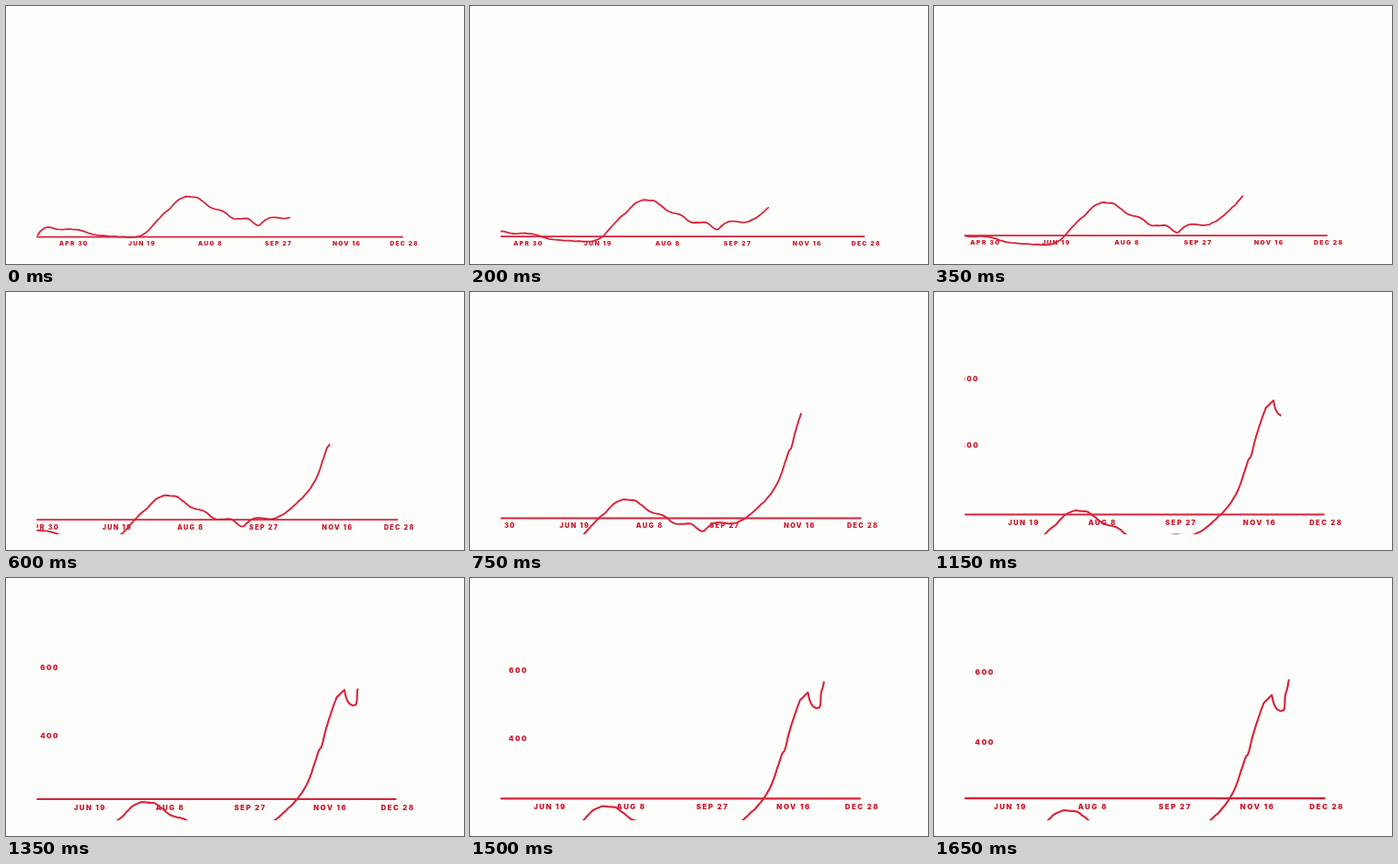
Animation, 498 px wide and 280 px high, one loop 1.7 s. Source, as an HTML page:

```html
<!DOCTYPE html>
<html lang="en">
<head>
<meta charset="utf-8">
<title>Rising line chart</title>
<style>
  html, body { margin: 0; width: 100%; height: 100%; overflow: hidden; background: #fdfefc; }
  svg { display: block; width: 100vw; height: 100vh; }
  text { font: 900 6.6px Inter, "Open Sans", sans-serif; letter-spacing: 1.25px; fill: #cb1c30; }
  .line { fill: none; stroke: #d8233a; stroke-width: 1.75; stroke-linejoin: round; }
</style>
</head>
<body>
<svg viewBox="0 0 498 280">
  <clipPath id="frame"><rect x="33.3" y="0" width="465" height="263"/></clipPath>
  <g clip-path="url(#frame)">
    <g id="axis"><path class="line" d="M-400 0H61.7"/></g>
    <g id="plot"><polyline id="curve" class="line"/></g>
    <g id="scale"></g>
  </g>
</svg>
<script>
const LOOP = 1700, STEP = 50, LAST = LOOP - STEP;
const $ = id => document.getElementById(id);
const mix = (a, b, u) => a + (b - a) * u;
const easeOut = (u, power) => 1 - (1 - u) ** power;
const smoothstep = u => u * u * (3 - 2 * u);

let seed = 7;
const wobble = () => ((seed = seed * 16807 % 2147483647) / 2147483647 - 0.5) * 0.7;

// Key points of the data line; the sharp peak joins the two parts
const climb = [
  [34, 249.5], [38, 244], [45, 240], [58, 242.5], [70, 242], [84, 244.3], [95, 248],
  [118, 250], [137, 251], [149, 248], [158, 240], [170, 226.8], [178, 220.2], [186, 211.5],
  [194, 207.3], [203, 207.3], [210, 209], [222, 218.5], [231, 221], [238, 224], [244, 229],
  [250, 231], [263, 230.7], [270, 236], [275, 238], [281, 233], [289, 229.5], [305, 230.3],
  [318, 224.4], [329, 215], [341, 202.5], [350.5, 186.6], [359.5, 160], [362.5, 155],
  [367, 137.5], [375.3, 112.9], [378, 108.5], [383.5, 103]
];
const rebound = [
  [383.5, 103], [386, 112.5], [390.7, 117.3], [394.7, 115.3], [395.5, 104], [397.3, 97.5], [399, 88.9]
];

// Catmull-Rom spline with a little roughness between the keys
function spline(keys, parts = 4) {
  const key = i => keys[Math.max(0, Math.min(keys.length - 1, i))];
  const out = [keys[0]];
  for (let i = 0; i < keys.length - 1; i++) {
    for (let k = 1; k <= parts; k++) {
      const u = k / parts;
      const [x, y] = [0, 1].map(d => {
        const [a, b, c, e] = [-1, 0, 1, 2].map(j => key(i + j)[d]);
        return b + u / 2 * (c - a + u * (2 * a - 5 * b + 4 * c - e + u * (3 * (b - c) + e - a)));
      });
      out.push([x, k < parts ? y + wobble() : y]);
    }
  }
  return out;
}
const points = [...spline(climb), ...spline(rebound)];

// Camera keys, joined by straight moves
const times = [0, 350, 1000, LAST];
const zoom  = [1, 1.039, 1.136, 1.207];
const panY  = [207, 213.5, 233, 252.5];

function along(values, t) {
  const i = t < times[1] ? 0 : t < times[2] ? 1 : 2;
  return mix(values[i], values[i + 1], (t - times[i]) / (times[i + 1] - times[i]));
}

function addText(parent, str, x, y, anchor) {
  const el = document.createElementNS("http://www.w3.org/2000/svg", "text");
  el.textContent = str;
  el.setAttribute("x", x);
  el.setAttribute("y", y);
  el.setAttribute("text-anchor", anchor);
  parent.append(el);
}

// Dates fifty days apart, the last one closer
["APR 30", "JUN 19", "AUG 8", "SEP 27", "NOV 16", "DEC 28"].forEach((str, i) =>
  addText($("axis"), str, Math.min(74.2 * (i - 4), 62.5) + 0.6, 9.9, "middle"));
["400", "600"].forEach((str, i) =>
  addText($("scale"), str, 1.25, -59.3 - 62.6 * i, "end"));

function place(id, x, y, s, shift = "") {
  $(id).setAttribute("transform", `translate(${x} ${y}) scale(${s}) ${shift}`);
}

function drawnTo(x) {
  const n = points.findIndex(p => p[0] >= x);
  if (n < 1) return points;
  const [ax, ay] = points[n - 1], [bx, by] = points[n];
  return [...points.slice(0, n), [x, mix(ay, by, (x - ax) / (bx - ax))]];
}

function render(t) {
  const u = t / LAST, s = along(zoom, t), y = along(panY, t);
  const x = mix(370, 351, easeOut(u, 1.7));
  place("plot", x, y, s, "translate(-370 -207)");
  place("axis", x, mix(250.5, 239.1, smoothstep(u)), s);
  place("scale", mix(-30, 64.5, easeOut(u, 1.45)), y, s);
  $("curve").setAttribute("points", drawnTo(mix(309, 399, easeOut(u, 2))).join(" "));
}

const start = performance.now();
function tick() {
  const t = (performance.now() - start) % LOOP;
  render(Math.floor(t / STEP) * STEP);
  requestAnimationFrame(tick);
}
tick();
</script>
</body>
</html>
```
